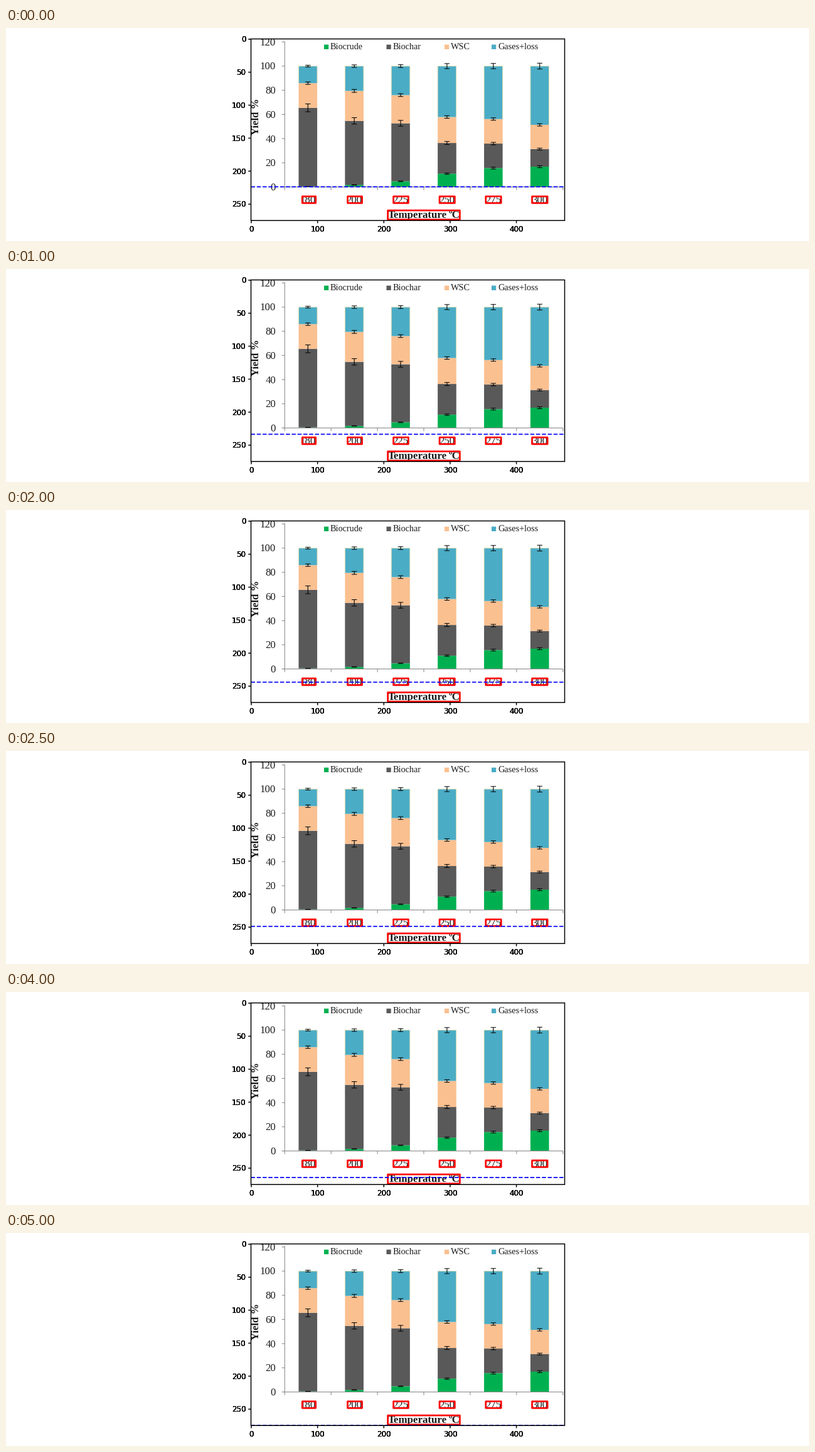
A matplotlib script that plays this animation: 1280 by 341 pixels, repeating every 5100 ms.

```python
import matplotlib.pyplot as plt
import numpy as np
from matplotlib.animation import FuncAnimation
from matplotlib.patches import Rectangle

W, H, DPI = 1280, 341, 64
PT = 72 / DPI                      # points per pixel
SERIF, SANS = "Liberation Serif", "DejaVu Sans"
INK, AXIS = "#1c1c1c", "#8c8c8c"
FRAMES, INTERVAL = 51, 100

fig = plt.figure(figsize=(W / DPI, H / DPI), dpi=DPI, facecolor="white")
ax = fig.add_axes([0, 0, 1, 1])
ax.set(xlim=(0, W), ylim=(H, 0))
ax.axis("off")

# Frame of the outer plot and its pixels per data unit
LEFT, TOP, RIGHT, BOTTOM = 390.5, 17.5, 890.5, 308.2
UNIT = 1.0565


def line(x, y, color, width, z=2, **kw):
    return ax.plot(x, y, color=color, lw=width * PT, zorder=z, snap=False,
                   solid_capstyle="butt", **kw)[0]


def rect(x0, y0, x1, y1, z=1, **kw):
    patch = Rectangle((x0, y0), x1 - x0, y1 - y0, zorder=z, snap=False, **kw)
    return ax.add_patch(patch)


def label(x, y, text, size, font=SERIF, color=INK, clip=None, **kw):
    item = ax.text(x, y, text, fontsize=size * PT, family=font, color=color,
                   zorder=2, va="baseline", clip_on=clip is not None, **kw)
    if clip is not None:
        item.set_clip_path(clip)


def heavy_label(x, y, text, **kw):
    # Repeated drawing darkens the antialiased edges.
    for _ in range(4):
        label(x, y, text, 11.85, SANS, "black", **kw)


def red_box(x0, y0, x1, y1):
    rect(x0, y0, x1, y1, z=3, fc="none", ec="red", lw=2.7 * PT,
         joinstyle="round")
    return rect(x0 + 1, y0, x1, y1, fc="none", ec="none")


view = rect(LEFT, TOP, RIGHT, BOTTOM, fc="none", ec="none")

# Outer axes
rect(LEFT, TOP, RIGHT, BOTTOM, z=6, fc="none", ec="black", lw=1.5 * PT)
for value in range(0, 401, 100):
    x = 391 + value * UNIT
    line([x, x], [BOTTOM, BOTTOM + 4.3], "black", 1.5, z=6)
    heavy_label(x, 325.7, str(value), ha="center")
for value in range(0, 251, 50):
    y = 17.9 + value * UNIT
    line([LEFT - 4.3, LEFT], [y, y], "black", 1.5, z=6)
    heavy_label(382.3, y + 4.4, str(value), ha="right")

# Chart axes
X0, Y0, STEP, PERCENT = 444.3, 254.5, 73.9, 1.935
line([X0, X0], [21.5, Y0], AXIS, 1.1)
line([X0 - 4.5, X0 + 6 * STEP], [Y0, Y0], AXIS, 1.1)
for i in range(7):
    y = Y0 - 20 * i * PERCENT
    line([X0 - 4.5, X0], [y, y], AXIS, 1.1)
    label(430, y + 5.5, str(20 * i), 16.7, ha="right", clip=view)
    x = X0 + i * STEP
    line([x, x], [Y0, Y0 + 5], AXIS, 1.1)
label(402.8, 141.3, "Yield %", 16.7, weight="bold", rotation=90,
      rotation_mode="anchor", ha="center", clip=view)

# Legend
COLORS = ["#00b050", "#595959", "#fac090", "#4bacc6"]
NAMES = ["Biocrude", "Biochar", "WSC", "Gases+loss"]
for color, name, x in zip(COLORS, NAMES, [507, 606.5, 699, 774]):
    rect(x, 26.6, x + 7.2, 34, fc=color, ec="none")
    label(x + 10, 34.5, name, 14.2)

# Stacked bars: the gas share fills up to 100 %, errors are 5 % of each share
biocrude = np.array([.5, 1.7, 4.7, 11, 15.6, 16.8])
biochar = np.array([65, 53, 48, 25.4, 20.3, 14.6])
wsc = np.array([20.4, 24.8, 23.3, 21.5, 20.3, 20])
shares = np.array([biocrude, biochar, wsc, 100 - biocrude - biochar - wsc])
tops = Y0 - np.cumsum(shares, axis=0) * PERCENT
errors = .05 * shares * PERCENT

for i, temperature in enumerate([180, *range(200, 301, 25)]):
    x = X0 + (i + .5) * STEP
    x0, x1 = x - 14.8, x + 14.8
    base = Y0
    for color, top, err in zip(COLORS, tops[:, i], errors[:, i]):
        rect(x0, top, x1, base, fc=color, ec="none")
        line([x, x], [top - err, top + err], "black", 1.1, z=3)
        for cap in (top - err, top + err):
            line([x - 4.2, x + 4.2], [cap, cap], "black", 1, z=3)
        base = top
    shoulder, top = tops[2:, i]
    line([x0, x0, x1, x1], [shoulder, top, top, shoulder], "#e3dfb0", .9)

    # The boxes hug the labels more tightly towards the left.
    box = red_box(x - 12.3 + 3.3 * .5 ** i, 269.6, x + 12.4, 280.3)
    label(x, 280.3, str(temperature), 16.7, ha="center", clip=box)

box = red_box(608.6, 292, 723.4, 306.7)
label(608.6, 303.8, "Temperature", 16.9, weight="bold", clip=box)
label(723.8, 303.8, "ºC", 16.9, weight="bold", ha="right", clip=box)

# Sweeping line
sweep = line([LEFT, RIGHT], [Y0, Y0], "blue", 1.75, z=5, linestyle="--")
sweep.set_clip_path(view)


def update(n):
    # Whole steps of a 400 pixel high canvas scaled to the stage
    y = round(297.95 + 1.2525 * n) * 12.8 / 15
    sweep.set_ydata([y, y])
    return sweep,


anim = FuncAnimation(fig, update, frames=FRAMES, interval=INTERVAL,
                     repeat=True, repeat_delay=0, blit=False)
plt.show()
```
